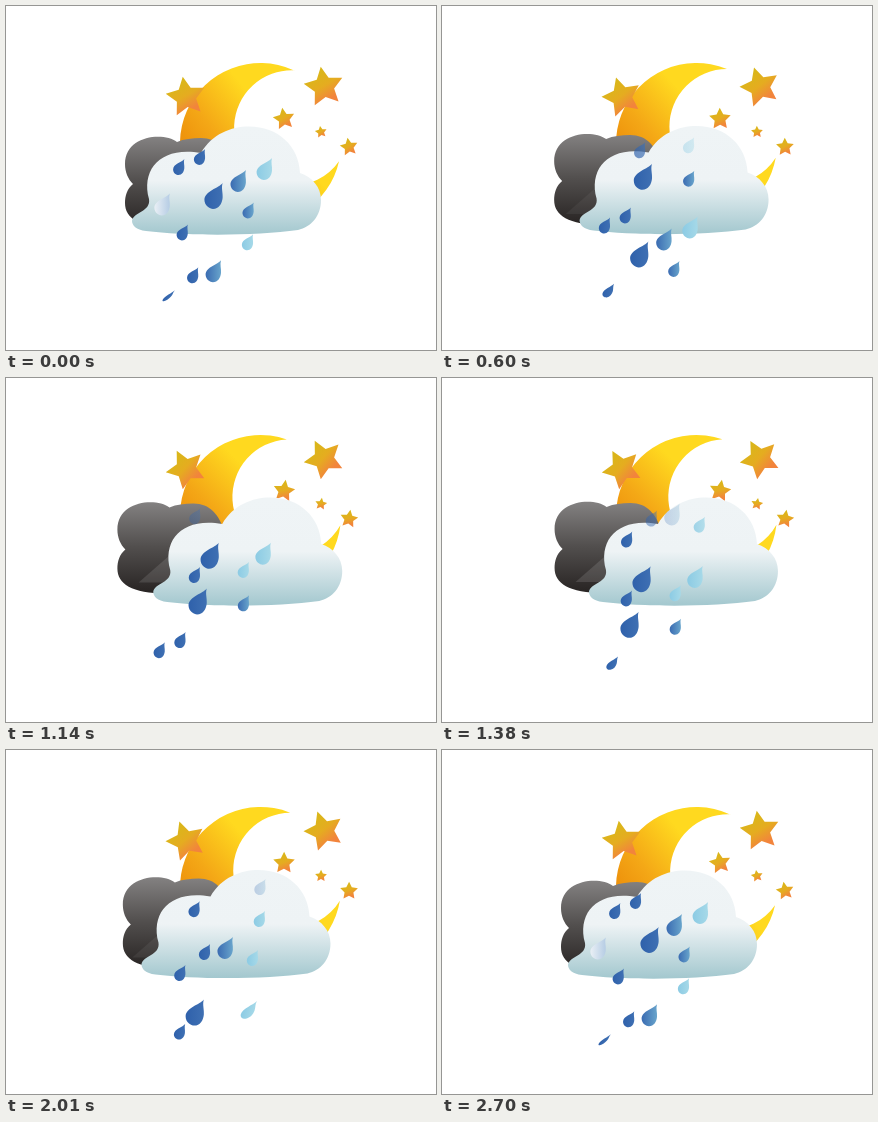
An HTML page with a canvas for the animation above (2.73 s loop, 430 by 344 pixels).

```html
<!DOCTYPE html>
<html lang="en">
<head>
<meta charset="utf-8">
<title>Rainy night</title>
<style>
html, body { margin: 0; width: 100%; height: 100%; overflow: hidden; background: #fff; }
canvas { display: block; }
</style>
</head>
<body>
<canvas id="stage" width="430" height="344"></canvas>
<script>
const ctx = document.getElementById('stage').getContext('2d');
const LOOP = 2730, CYCLE = 2700, STEP = 30;
const FALL = 0.0975, SLANT = -0.176; // px per ms, sideways px per px down

const dropShape = new Path2D(
  'M.34-.5C.2-.3-.35-.2-.36.15C-.36.38-.15.5-.03.5C.2.5.32.3.34.08C.36-.12.28-.3.34-.5Z');
const whiteCloud = new Path2D(
  'M195 147C206 128 225 120.5 243 120.5C272 120.5 293 140 294 167C306 171 315 181 315 194' +
  'C315 210 305 221 292 224C250 230 180 230 140 225C130 224 126 219 126 215' +
  'C127 206 145 206 143 193C135 163 155 140 195 147Z');
const darkCloud = new Path2D(
  'M163 129C150 119 111 122 111 151C111 159 114 166 119 171C113 176 111 183 111 190' +
  'C111 205 125 215 160 215L220 215C225 170 220 125 187 125C178 125 170 126 163 129Z');

// Crescent: outer circle minus inner circle, tip to tip
const moon = new Path2D();
moon.arc(0, 0, 80.5, 0.221, -1.139);
moon.arc(31.3, -15.5, 57.7, -1.529, 0.612, true);
moon.closePath();

const STARS = [[180, 91, 20.5], [318, 81, 20.5], [278, 113, 11.3], [315, 126, 6.2], [343, 141, 9.3]];

// Drops vanish at the height "end"
const dark = { colors: ['#2f61ab', '#3f70b3'], end: 295 };
const medium = { colors: ['#3b6cb2', '#69a5cc'], end: 284 };
const light = { colors: ['#8ccbe4', '#a6d9e8'], end: 269 };
const pale = { colors: ['#e9eff5', '#b5cce4'], end: 220 };

// kind, height, [time, x] of each drop when it passes MID_Y
const MID_Y = 200;
const RAIN = [
  [pale, 22, [[16, 156]]],
  [dark, 16, [[400, 166], [503, 185], [1171, 188], [1774, 178], [1989, 199], [2429, 181]]],
  [dark, 26, [[103, 206], [900, 196], [1368, 200]]],
  [medium, 16, [[880, 242], [2655, 243]]],
  [medium, 22, [[256, 228], [2031, 219]]],
  [light, 16, [[1223, 236], [1927, 248], [2328, 248]]],
  [light, 22, [[379, 252], [1390, 253]]]
];

function gradient(x0, y0, x1, y1, ...colors) {
  const g = ctx.createLinearGradient(x0, y0, x1, y1);
  colors.forEach((color, i) => g.addColorStop(i / (colors.length - 1), color));
  return g;
}

function at(x, y, draw) {
  ctx.save();
  ctx.translate(x, y);
  draw();
  ctx.restore();
}

// 0 to 1 and back over one cycle; a lower skew peaks earlier
function sway(t, skew = 1) {
  return Math.sin(Math.PI * (t / CYCLE) ** skew) ** 2;
}

function drawMoon(t) {
  at(254.5, 137.5, () => {
    ctx.rotate(-0.105 * sway(t));
    ctx.fillStyle = gradient(-75, 35, 5, -30, '#e98305', '#f4a716', '#ffd91f');
    ctx.fill(moon);
  });
}

function drawStar([x, y, r], t) {
  const turn = r > 15 ? -0.33 : 0.33;
  at(x, y, () => {
    ctx.rotate(-0.16 + turn * sway(t));
    ctx.beginPath();
    for (let i = 0; i < 10; i++) {
      const a = (i / 5 - 0.5) * Math.PI, d = i % 2 ? r * 0.5 : r;
      ctx.lineTo(d * Math.cos(a), d * Math.sin(a));
    }
    ctx.fillStyle = gradient(-r * 0.3, -r * 0.7, r * 0.2, r * 0.6, '#dab61a', '#e5ac20', '#f2843c');
    ctx.fill();
  });
}

function drawClouds(t) {
  const shift = 21.5 * sway(t, 0.89);
  at(8 - 8 * sway(t, 0.65), 7 - 7 * sway(t), () => {
    ctx.fillStyle = gradient(0, 124, 0, 212, '#838181', '#524f4e', '#2a2625');
    ctx.fill(darkCloud);
    ctx.clip(darkCloud);
    // Faint light on the dark cloud beside the white one
    ctx.fillStyle = `rgba(255,255,255,${0.12 * sway(t)})`;
    ctx.beginPath();
    ctx.moveTo(111 + shift, 204);
    ctx.lineTo(143 + shift, 176);
    ctx.lineTo(143 + shift, 204);
    ctx.fill();
  });
  at(shift, -sway(t), () => {
    ctx.fillStyle = gradient(0, 120, 0, 229, '#eff4f6', '#eef3f5', '#a2c7ce');
    ctx.fill(whiteCloud);
  });
}

function drawDrop({ colors, end }, size, [time, x], t) {
  const age = (t - time + CYCLE * 1.5) % CYCLE - CYCLE / 2;
  const fallen = age * FALL, y = MID_Y + fallen, start = 132;
  if (y <= start || y >= end) return;
  at(x + fallen * SLANT, y, () => {
    ctx.globalAlpha = Math.min(1, (y - start) / 18);
    // Thin out along the slanted axis before vanishing
    ctx.rotate(-0.6);
    ctx.scale(1, Math.min(1, (end - y) / 14));
    ctx.rotate(0.6);
    ctx.scale(size, size);
    ctx.fillStyle = gradient(-0.35, 0, 0.35, 0, ...colors);
    ctx.fill(dropShape);
  });
}

function render(now) {
  const t = Math.floor(now % LOOP / STEP) * STEP % CYCLE;
  ctx.fillStyle = '#fff';
  ctx.fillRect(0, 0, 430, 344);
  drawMoon(t);
  STARS.forEach(star => drawStar(star, t));
  drawClouds(t);
  for (const [kind, size, drops] of RAIN) {
    drops.forEach(drop => drawDrop(kind, size, drop, t));
  }
}

const begin = performance.now();
function tick() {
  render(performance.now() - begin);
  requestAnimationFrame(tick);
}
tick();
</script>
</body>
</html>
```
